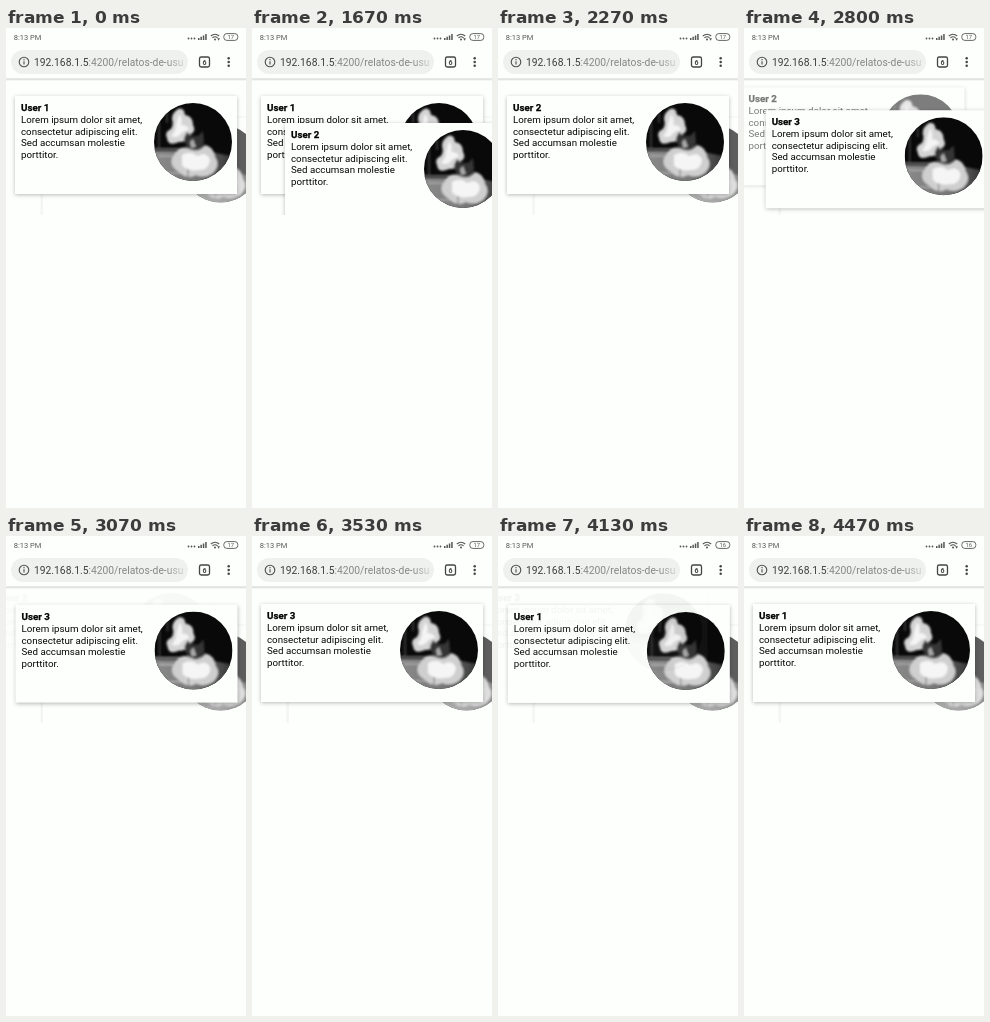
Write an HTML page that moves like this. It is 240 by 480 pixels and loops after 5270 ms.

```html
<!DOCTYPE html>
<html lang="en">
<head>
<meta charset="utf-8">
<title>Card carousel</title>
<style>
  html, body { margin: 0; width: 100%; height: 100%; overflow: hidden; background: #fdfffd; }
  body { position: relative; font-family: Roboto, "Open Sans", sans-serif; }
  .bar { position: absolute; left: 0; top: 0; z-index: 2; display: block; }
  .deck { position: absolute; left: 0; top: 51px; width: 240px; height: 136px; overflow: hidden; }
  .card {
    position: absolute; left: 9px; top: 17px; width: 222px; height: 98px;
    background: #fdfffd; box-shadow: 0 1px 4px rgba(0, 0, 0, .27);
    font-size: 9.75px; line-height: 11.65px; color: #050505;
  }
  .card p { position: absolute; left: 6px; top: 6.2px; margin: 0; white-space: nowrap; }
  .card b { -webkit-text-stroke: .25px #000; color: #000; }
  .card svg { position: absolute; left: 138.5px; top: 6.5px; }
  .back { transform: translate(27.5px, 21.5px); opacity: .65; }
</style>
</head>
<body>
<svg class="bar" width="240" height="54" viewBox="0 0 240 54">
  <defs>
    <linearGradient id="drop" x2="0" y2="1">
      <stop stop-color="#cfd1cf"/><stop offset="1" stop-color="#cfd1cf" stop-opacity="0"/>
    </linearGradient>
    <linearGradient id="fade" gradientUnits="userSpaceOnUse" x1="160" x2="178">
      <stop stop-color="#858785"/><stop offset="1" stop-color="#858785" stop-opacity=".25"/>
    </linearGradient>
    <linearGradient id="floor">
      <stop stop-color="#8c8c8c"/><stop offset=".55" stop-color="#777"/><stop offset="1" stop-color="#2c2c2c"/>
    </linearGradient>
    <filter id="soft"><feGaussianBlur stdDeviation="1.1"/></filter>
    <clipPath id="disc"><circle cx="39" cy="39" r="39"/></clipPath>
    <symbol id="photo" viewBox="0 0 78 78">
      <g clip-path="url(#disc)">
        <rect width="78" height="78" fill="#090909"/>
        <g filter="url(#soft)">
          <path d="M-4 48H52L82 54V82H-4Z" fill="url(#floor)"/>
          <path d="M-2 46H30M4 53H26M8 70H30" stroke="#bbb" stroke-width="1.2"/>
          <path d="M5 16V44M13 10V20" stroke="#333" stroke-width="2"/>
          <path d="M24 6Q30 4 31 12Q39 13 39 22Q43 29 35 32Q31 40 25 39Q14 44 13 35Q10 29 17 26Q20 22 18 16Q18 10 24 6Z" fill="#d4d4d4"/>
          <path d="M25 11Q29 16 27 22Q34 22 35 27Q28 28 25 33Q20 35 17 33Q22 28 22 22Z" fill="#f4f4f4"/>
          <path d="M30 35L33 29L37 33H44L49 28L50 39Q48 47 39 47Q31 45 30 35Z" fill="#353535"/>
          <path d="M36 39L39 36L42 44L37 45Z" fill="#aaa"/>
          <path d="M22 49Q28 42 36 46Q44 50 51 42Q60 44 61 54Q67 62 59 70Q50 76 42 72Q33 77 25 69Q15 63 18 55Z" fill="#cfcfcf"/>
          <path d="M28 52Q37 47 43 53Q53 48 56 57Q55 67 45 67Q33 69 28 62Z" fill="#f5f5f5"/>
          <path d="M34 66V79" stroke="#777" stroke-width="1"/>
        </g>
      </g>
    </symbol>
  </defs>

  <rect width="240" height="51" fill="#fdfffd"/>
  <rect y="50.5" width="240" height="2.5" fill="url(#drop)"/>

  <g fill="#555" font-size="7.5">
    <text x="7.7" y="11.6">8:13 PM</text>
    <circle cx="182.5" cy="10.5" r=".9"/><circle cx="185.5" cy="10.5" r=".9"/><circle cx="188.5" cy="10.5" r=".9"/>
    <path d="M192 10h1.5v2h-1.5zM194.4 8.8h1.5v3.2h-1.5zM196.8 7.4h1.5v4.6h-1.5zM199.2 6h1.5v6h-1.5z"/>
    <g fill="none" stroke="#555" stroke-width="1.1">
      <path d="M204.8 8Q209 4.4 213.2 8M206.4 9.8Q209 7.6 211.6 9.8"/>
      <rect x="217.8" y="5.6" width="14" height="6.8" rx="3" stroke-width=".9"/>
    </g>
    <circle cx="209" cy="11.6" r="1"/>
    <path id="arrow" d="M211.2 10.2h2.8l-1.4 2.6z"/>
    <text id="level" x="224.8" y="11.1" font-size="5.8" text-anchor="middle">17</text>
  </g>

  <rect x="5" y="22" width="177" height="24" rx="12" fill="#eff1ef"/>
  <circle cx="18" cy="34" r="4.8" fill="none" stroke="#4c4e4c" stroke-width="1.1"/>
  <path d="M18 33.3v3.3M18 31.1v1.2" stroke="#4c4e4c" stroke-width="1.1"/>
  <text x="28" y="37.7" font-size="10.3" fill="#3c3e3c">192.168.1.5<tspan fill="url(#fade)">:4200/relatos-de-usu</tspan></text>
  <rect x="193.5" y="29" width="10" height="10" rx="1.8" fill="none" stroke="#444" stroke-width="1.3"/>
  <text x="198.5" y="36.6" font-size="7" font-weight="700" text-anchor="middle" fill="#444">6</text>
  <g fill="#444"><circle cx="222.7" cy="30.2" r="1.25"/><circle cx="222.7" cy="34" r="1.25"/><circle cx="222.7" cy="37.8" r="1.25"/></g>
</svg>

<div class="deck" id="deck"></div>

<script>
const LOOP = 5270, TICK = 200 / 3, SLIDE = 500;
const ENTER = [24, 27], LEAVE = [-22.2, -18.4];
// each move: when the new card appears, when it starts sliding, which cards swap
const moves = [
  { show: 1660, go: 1703, from: 0, to: 1 },
  { show: 2660, go: 2660, from: 1, to: 2 },
  { show: 3790, go: 3750, from: 2, to: 0 }
];
const $ = id => document.getElementById(id);

const cardHtml = (n, cls = '') => `<div class="card ${cls}">
  <p><b>User ${n}</b><br>Lorem ipsum dolor sit amet,<br>consectetur adipiscing elit.<br>Sed accumsan molestie<br>porttitor.</p>
  <svg width="78" height="78"><use href="#photo"/></svg></div>`;
$('deck').innerHTML = cardHtml(2, 'back') + [1, 2, 3].map(n => cardHtml(n)).join('');
const cards = [...document.querySelectorAll('.card:not(.back)')];

// CSS "ease": cubic-bezier(.25, .1, .25, 1)
function ease(x) {
  if (x <= 0) return 0;
  if (x >= 1) return 1;
  const bez = (a, b, s) => 3 * a * s * (1 - s) ** 2 + 3 * b * s * s * (1 - s) + s ** 3;
  let lo = 0, hi = 1;
  for (let i = 0; i < 24; i++) {
    const mid = (lo + hi) / 2;
    if (bez(.25, .25, mid) < x) lo = mid; else hi = mid;
  }
  return bez(.1, 1, lo);
}

function place(card, [x, y], k, opacity) {
  card.style.transform = `translate(${x * k}px, ${y * k}px)`;
  card.style.opacity = opacity;
}

function draw(ms) {
  const t = Math.floor((ms + 4) / TICK) * TICK;
  const move = moves.filter(m => t >= m.show).pop();
  cards.forEach(c => place(c, ENTER, 0, 0));
  if (move) {
    const p = ease((t - move.go) / SLIDE);
    place(cards[move.from], LEAVE, p, 1 - p);
    place(cards[move.to], ENTER, 1 - p, 1);
  } else {
    place(cards[0], ENTER, 0, 1);
  }
  $('arrow').style.opacity = ms >= 3530 && ms < 4470 ? 0 : 1;
  $('level').textContent = ms >= 3800 ? 16 : 17;
}

const start = performance.now();
function frame() {
  draw((performance.now() - start) % LOOP);
  requestAnimationFrame(frame);
}
frame();
</script>
</body>
</html>
```
